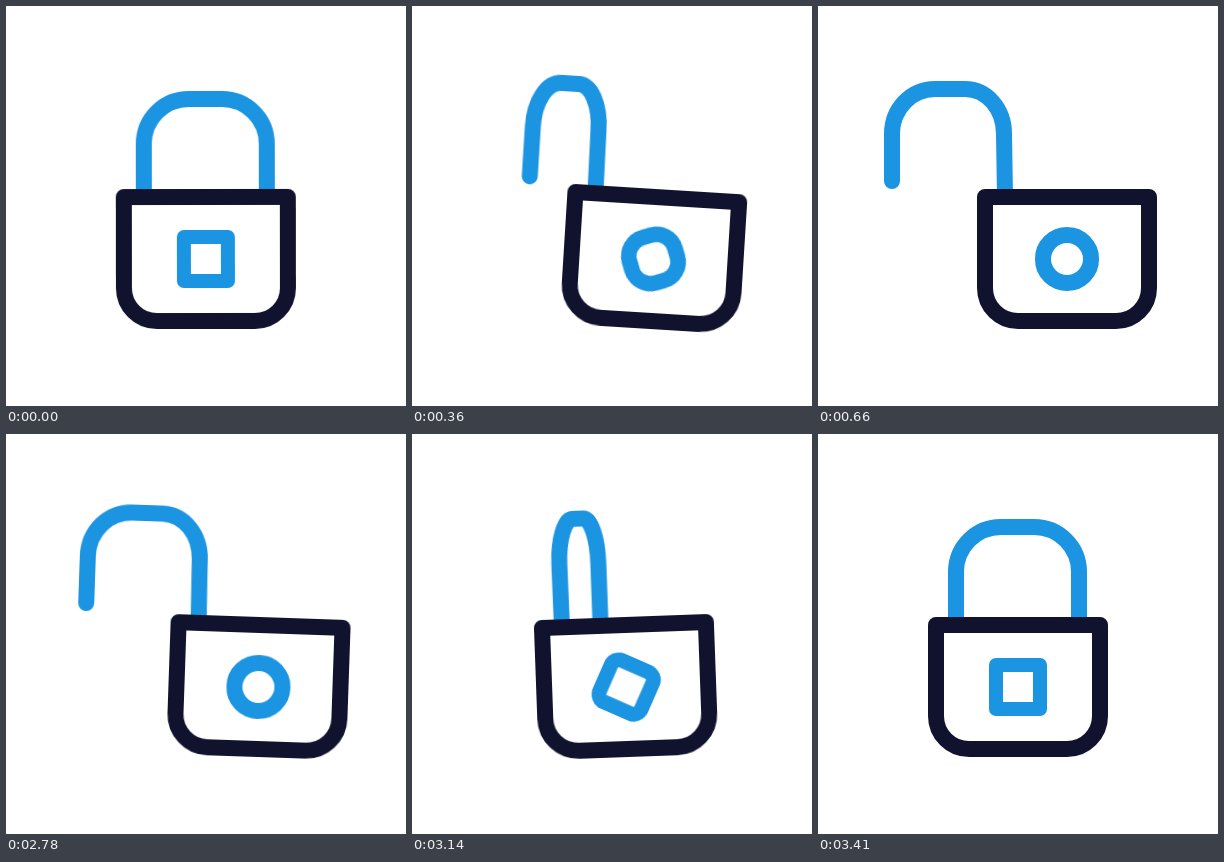
Write an HTML page without scripts that moves like this. It is 400 px wide and 400 px high and loops after 4.44 s.

```html
<!DOCTYPE html>
<html lang="en">
<head>
<meta charset="utf-8">
<title>Padlock</title>
<style>
  html, body { margin: 0; height: 100%; overflow: hidden; background: #fff; }
  svg { display: block; width: 100%; height: 100%; }

  :root {
    --closed: path("M138 191 L138 138 C138 113 158 93 183 93 L216 93 C241 93 261 113 261 138 L261 191");
    --lifted: path("M138 191 L138 128 C138 103 158 83 183 83 L216 83 C241 83 261 103 261 128 L261 191");
    --open: path("M138 191 L137 128 C137 103 120 83 98 83 L68 83 C44 83 25 103 25 128 L25 175");
  }

  /* Opening plays forwards, closing is the same move in reverse. */
  .lock, .shackle, .hole {
    animation: 2220ms linear -515ms infinite alternate both;
    transform-origin: 200px 253px;
  }
  .lock { animation-name: rock; }
  .shackle { animation-name: turn; }
  .hole { animation-name: morph; }

  .shackle, .hole, .body {
    fill: none;
    stroke-width: 16px;
    stroke-linecap: round;
    stroke-linejoin: round;
  }
  .shackle, .hole { stroke: #1b94e2; }
  .body { stroke: #11122e; }

  /* Wind up to the left, swing past the open position, settle back. */
  @keyframes rock {
    0% { transform: translateX(0) rotate(0deg); }
    23.2% { transform: translateX(0) rotate(0deg); animation-timing-function: cubic-bezier(.2, .15, .5, 1); }
    28.2% { transform: translateX(-14.5px) rotate(-8deg); animation-timing-function: cubic-bezier(.333, 0, .667, 1); }
    45.45% { transform: translateX(63px) rotate(8deg); animation-timing-function: cubic-bezier(.5, 0, .8, .85); }
    52.93%, 100% { transform: translateX(49px) rotate(0deg); }
  }

  @keyframes turn {
    0% { d: var(--closed); }
    23.2% { d: var(--closed); animation-timing-function: cubic-bezier(.2, .15, .5, 1); }
    29.95% { d: var(--lifted); animation-timing-function: cubic-bezier(.333, 0, .667, 1); }
    43.24%, 100% { d: var(--open); }
  }

  @keyframes morph {
    0%, 23.2%, 29.95% {
      x: 178px; y: 231px; width: 44px; height: 44px; rx: 0px; ry: 0px; stroke-width: 14px;
    }
    0% { transform: rotate(0deg); }
    23.2% { transform: rotate(0deg); animation-timing-function: cubic-bezier(.2, .15, .5, 1); }
    29.95% { transform: rotate(-10deg); }
    29.95% { animation-timing-function: cubic-bezier(.333, 0, .667, 1); }
    43.24%, 100% {
      x: 176px; y: 229px; width: 48px; height: 48px; rx: 24px; ry: 24px; stroke-width: 16px;
      transform: rotate(90deg);
    }
  }

  /* Shape and tilt share the swing, so both keyframes above ease alike. */
  .hole { animation-timing-function: cubic-bezier(.333, 0, .667, 1); }
</style>
</head>
<body>
<svg viewBox="0 0 400 400">
  <g class="lock">
    <path class="shackle" d="M138 191 L138 138 C138 113 158 93 183 93 L216 93 C241 93 261 113 261 138 L261 191"/>
    <path class="body" d="M118 191 H282 V282 a33 33 0 0 1 -33 33 H151 a33 33 0 0 1 -33 -33 Z"/>
    <rect class="hole" x="178" y="231" width="44" height="44"/>
  </g>
</svg>
</body>
</html>
```
